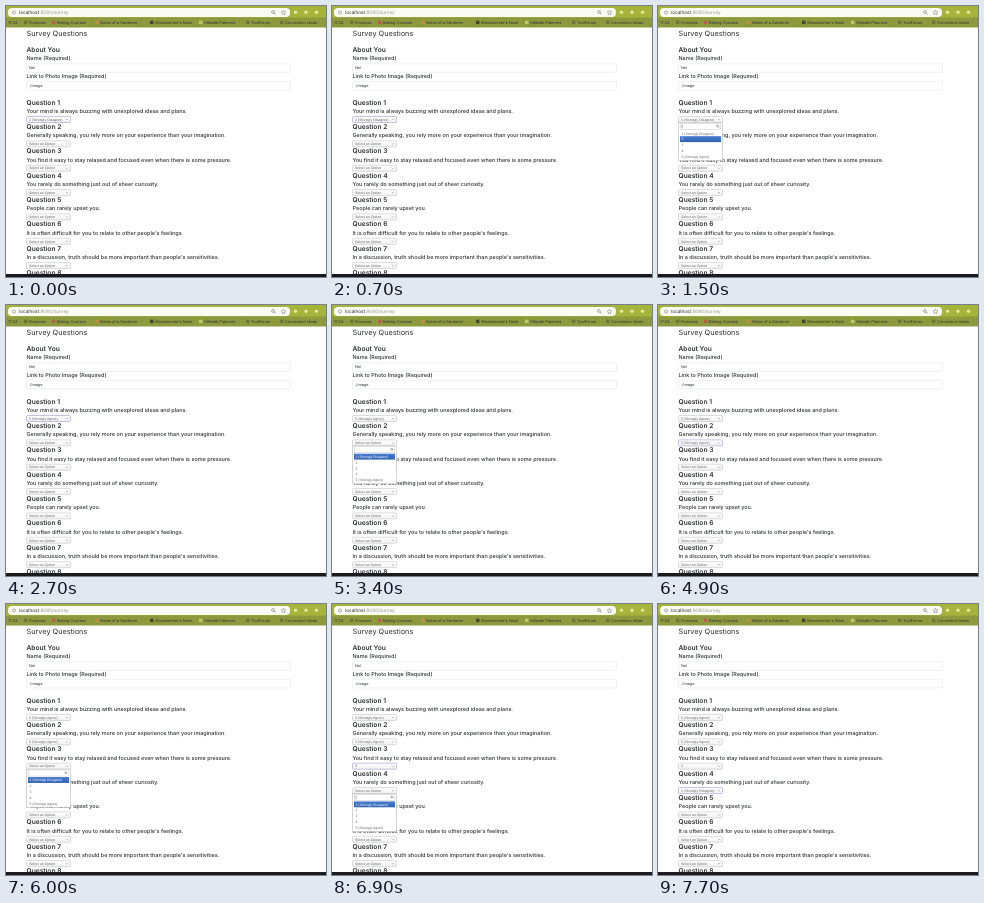
These frames come from a looping animation (320x271 px, 8000 ms). An HTML page:

```html
<!DOCTYPE html>
<html lang="en">
<head>
<meta charset="utf-8">
<title>Survey</title>
<style>
  html, body { margin: 0; width: 100%; height: 100%; overflow: hidden; background: #fff; }
  svg { display: block; width: 320px; height: 271px; }
  text { font-family: Inter, sans-serif; fill: #2e3033; white-space: pre; text-rendering: geometricPrecision; }
  .small { font-family: "Liberation Sans", Arial, sans-serif; fill: #686868; }
</style>
</head>
<body>
<svg id="stage" viewBox="0 0 320 271">
  <defs>
    <linearGradient id="select" x2="0" y2="1"><stop stop-color="#fff"/><stop offset="1" stop-color="#f1f1f1"/></linearGradient>
    <linearGradient id="active" x2="0" y2="1"><stop stop-color="#467cd0"/><stop offset="1" stop-color="#3262b0"/></linearGradient>
  </defs>
</svg>
<script>
const LOOP = 8000, ROW = 24.35, FIRST = 113.5, BLINK = 500;
const options = ['1 (Strongly Disagree)', '2', '3', '4', '5 (Strongly Agree)'];
const questions = [
  'Your mind is always buzzing with unexplored ideas and plans.',
  'Generally speaking, you rely more on your experience than your imagination.',
  'You find it easy to stay relaxed and focused even when there is some pressure.',
  'You rarely do something just out of sheer curiosity.',
  'People can rarely upset you.',
  'It is often difficult for you to relate to other people\'s feelings.',
  'In a discussion, truth should be more important than people\'s sensitivities.'
];
// One visit per question: hover lists [time, option] pairs; the last one is chosen.
const visits = [
  { open: 1100, close: 2000, blur: 2900, hover: [[1100, 0], [1500, 1], [1700, 3], [1800, 4]] },
  { open: 2900, close: 4500, blur: 5300, hover: [[2900, 0], [3900, 4]] },
  { open: 5300, close: 6400, blur: 7000, hover: [[5300, 0], [6100, 2]] },
  { open: 6900, close: 7500, blur: LOOP, hover: [[6900, 0]] }
];

const stage = document.getElementById('stage');

function add(parent, tag, attrs, content) {
  const node = document.createElementNS('http://www.w3.org/2000/svg', tag);
  for (const key in attrs) node.setAttribute(key, attrs[key]);
  if (content) node.textContent = content;
  return parent.appendChild(node);
}
const rect = (x, y, width, height, fill, more, parent = stage) =>
  add(parent, 'rect', { x, y, width, height, fill, ...more });
const circle = (cx, cy, r, fill, more, parent = stage) =>
  add(parent, 'circle', { cx, cy, r, fill, ...more });
const line = (d, stroke, width, parent = stage) =>
  add(parent, 'path', { d, stroke, 'stroke-width': width, fill: 'none' });
// y is the middle of the line of text
const label = (x, y, size, content, more, parent = stage) =>
  add(parent, 'text', { x, y: y + size * .36, 'font-size': size, ...more }, content);
const body = (y, content) => label(20.5, y, 5.45, content, { 'font-weight': 500 });
const heading = (y, content) => label(20.5, y, 6.65, content, { 'font-weight': 600 });
const show = (node, on) => node.setAttribute('visibility', on ? 'visible' : 'hidden');

function lens(x, y, r, color, parent) {
  circle(x, y, r, 'none', { stroke: color, 'stroke-width': .6 }, parent);
  line(`M${x + r * .7} ${y + r * .7}l${r} ${r}`, color, .7, parent);
}

function drawBrowser() {
  rect(0, 0, 320, 12, '#a6b43c');
  rect(0, 11.5, 320, 10, '#8d993d');
  rect(2, 2, 282, 9, '#fafbf3', { rx: 4 });
  circle(8, 6.5, 1.5, 'none', { stroke: '#777', 'stroke-width': .6 });
  const url = label(13, 6.5, 4.7, 'localhost', { fill: '#55584f' });
  add(url, 'tspan', { fill: '#989b92' }, ':8080/survey');
  lens(267, 6, 1.4, '#777');
  line('M277.5 4.2l.7 1.5 1.6.2-1.2 1.1.3 1.7-1.4-.8-1.4.8.3-1.7-1.2-1.1 1.6-.2z', '#777', .5);
  for (const x of [289.5, 300, 310.5]) circle(x, 6.3, 1.7, '#e2e7a0');
  const marks = [
    [2, '17:24'], [18, 'Finances', '#6b753a'], [46, 'Baking Courses', '#b4604a'],
    [89, 'Notes of a Gardener', '#c78c42'], [144, 'Woodworker\'s Nook', '#434826'],
    [193, 'Hillwalk Planners', '#bccb68'], [240, 'ToolForum', '#6b753a'],
    [274, 'Conversion Ideas', '#6b753a']
  ];
  for (const [x, name, color] of marks) {
    if (color) rect(x, 14.7, 3.4, 3.4, color);
    label(x + (color ? 5 : 0), 16.4, 3.9, name, { fill: '#515a28' });
  }
}

function drawField(y, value) {
  rect(20.5, y - 4.2, 264, 8.6, '#fff', { rx: 1, stroke: '#e4e6e8', 'stroke-width': .6 });
  label(23, y, 3.8, value, { fill: '#6a6a6a' });
}

function drawSelect(y) {
  const box = rect(20.5, y - 3, 44, 6, 'url(#select)', { rx: 1, 'stroke-width': .6 });
  const value = label(23, y, 3.55, '', { class: 'small' });
  line(`M59.8 ${y - .6}l1.2 1.2 1.2-1.2`, '#888', .5);
  return { box, value };
}

function drawMenu(y) {
  const group = add(stage, 'g', {});
  rect(20.5, y + 3, 44, 38, '#fff', { stroke: '#bbb', 'stroke-width': .6 }, group);
  rect(22.3, y + 3.7, 40.4, 6.2, '#fff', { stroke: '#c8c8c8', 'stroke-width': .5 }, group);
  lens(59.6, y + 6.4, .9, '#777', group);
  const caret = rect(23.8, y + 5, .5, 3.8, '#555', {}, group);
  const rowY = i => y + 13.8 + i * 5.85;
  const bar = rect(22, 0, 41, 5.9, 'url(#active)', {}, group);
  const items = options.map((name, i) => label(23.5, rowY(i), 3.45, name, { class: 'small' }, group));
  return { group, caret, bar, items, rowY };
}

drawBrowser();
label(20.5, 27, 7.3, 'Survey Questions');
heading(43.7, 'About You');
body(52, 'Name (Required)');
drawField(62, 'Nel');
body(69.7, 'Link to Photo Image (Required)');
drawField(79.5, './image');

const selects = questions.map((question, i) => {
  const y = FIRST + i * ROW;
  heading(y - 17.3, `Question ${i + 1}`);
  body(y - 8.4, question);
  return drawSelect(y);
});
heading(FIRST + 7 * ROW - 17.3, 'Question 8');
rect(0, 268, 320, 3, '#1b1a1e');
const menus = visits.map((_, i) => drawMenu(FIRST + i * ROW));

function render(t) {
  selects.forEach(({ box, value }, i) => {
    const visit = visits[i];
    const chosen = visit && t >= visit.close;
    const focused = chosen ? t < visit.blur : i === 0 && t < visit.open;
    const answer = chosen ? visit.hover.at(-1)[1] : i === 0 ? 0 : -1;
    box.setAttribute('stroke', focused ? '#a09bd0' : '#c4c4c4');
    value.textContent = options[answer] || 'Select an Option';
  });
  menus.forEach((menu, i) => {
    const { open, close, hover } = visits[i];
    const isOpen = t >= open && t < close;
    menu.group.setAttribute('display', isOpen ? 'inline' : 'none');
    if (!isOpen) return;
    const current = hover.filter(([time]) => time <= t).at(-1)[1];
    menu.bar.setAttribute('y', menu.rowY(current) - 2.95);
    menu.items.forEach((item, k) => { item.style.fill = k === current ? '#fff' : ''; });
    show(menu.caret, (t - open) % (2 * BLINK) < BLINK);
  });
}

const start = performance.now();
function tick() {
  render((performance.now() - start) % LOOP);
  requestAnimationFrame(tick);
}
tick();
</script>
</body>
</html>
```
